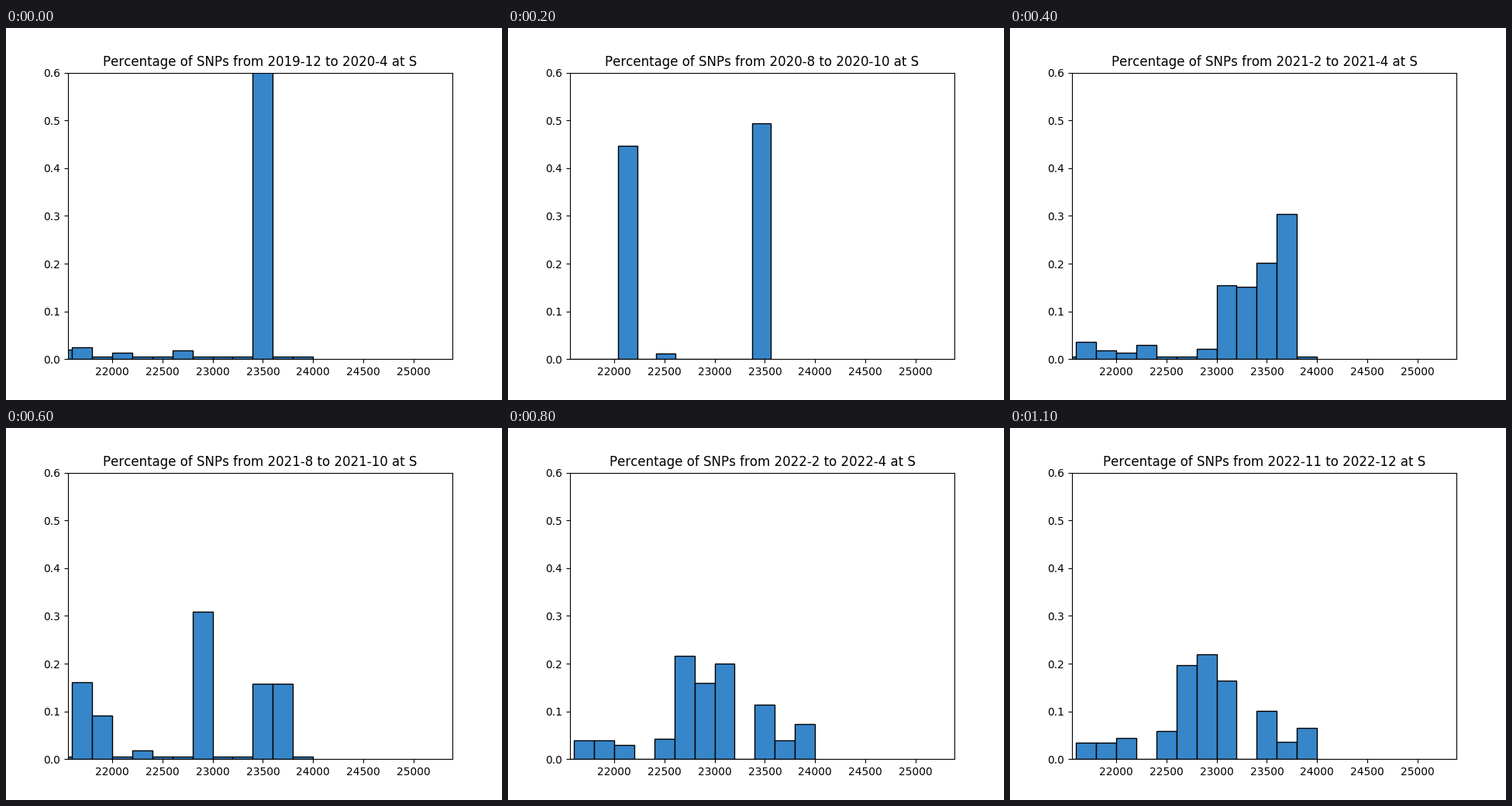
A matplotlib script that plays this animation: 640 by 480 pixels, repeating every 1.2 s.

```python
import numpy as np
import matplotlib.pyplot as plt
from matplotlib.animation import FuncAnimation

FRAMES = 12
BINS = 13
LATE = 8  # first period of the slowly drifting profile

# Dominant (position, share) points of the early periods.
EARLY = {
    0: [(21500, .020), (21700, .025), (22100, .013), (22700, .018), (23500, .887)],
    2: [(22100, .447), (22500, .012), (23450, .494)],
    4: [(21700, .036), (21900, .018), (22100, .013), (22300, .030), (22900, .021),
        (23100, .155), (23300, .151), (23500, .202), (23700, .304)],
    6: [(21700, .161), (21900, .091), (22300, .018), (22900, .309),
        (23500, .157), (23700, .157)],
}

plt.rcParams.update({"text.hinting": "force_autohint", "text.hinting_factor": 8,
                     "text.kerning_factor": 6})


def late_spikes(t):
    """Late profile, drifting as t goes from 0 to 1."""
    q = t * t
    plateau = .039 - .004 * t
    tail = .114 - .013 * q
    return [(21700, plateau), (21900, plateau), (22100, .030 + .014 * t),
            (22500, .043 + .016 * q ** 3), (22700, .216 - .019 * q),
            (22900, .159 + .060 * q), (23100, .200 - .036 * t),
            (23500, tail), (23700, .35 * tail), (23900, .65 * tail)]


def spikes(i):
    if i >= LATE:
        return late_spikes((i - LATE) / (FRAMES - 1 - LATE))
    if i % 2:
        return [(x, h / 2) for x, h in spikes(i - 1) + spikes(i + 1)]
    return EARLY[i]


def histogram(i):
    """Return the bin edges and heights of period i."""
    end, step = (23561, 190) if i == 2 else (24000, 200)
    floor = 0 if i == 2 else .001 if i >= LATE else .005
    edges = end - step * np.arange(BINS, -1, -1)
    x, share = zip(*spikes(i))
    heights, _ = np.histogram(x, edges, weights=share)
    return edges, np.maximum(heights, floor)


def month_name(m):
    return f"{2020 + m // 12}-{m % 12 + 1}"


def title(i):
    first = 3 * i + 1 if i else -1
    last = min(3 * i + 3, 35)
    return f"Percentage of SNPs from {month_name(first)} to {month_name(last)} at S"


fig, ax = plt.subplots(figsize=(6.4, 4.8), dpi=100)
bars = ax.bar(np.arange(BINS), np.zeros(BINS), align="edge",
              color="#3786c9", edgecolor="black", linewidth=1)
ax.set_xlim(21563, 25384)
ax.set_ylim(0, 0.6)


def draw(i):
    edges, heights = histogram(i)
    for bar, x, w, h in zip(bars, edges, np.diff(edges), heights):
        bar.set_bounds(x, 0, w, h)
    ax.set_title(title(i))
    return [*bars, ax.title]


anim = FuncAnimation(fig, draw, frames=FRAMES, interval=100,
                     repeat=True, repeat_delay=0, blit=False)
plt.show()
```
